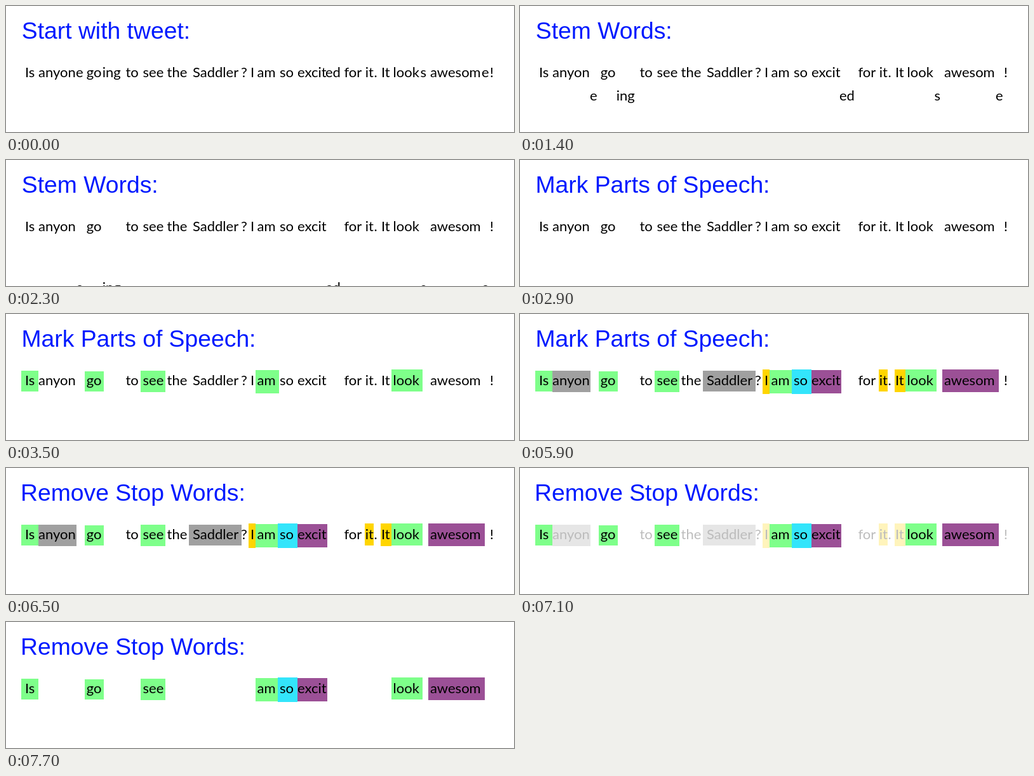
Animation, 800 px wide and 200 px high, one loop 8 s. Source, as an HTML page:

```html
<!DOCTYPE html>
<html lang="en">
<head>
<meta charset="utf-8">
<title>Tweet preprocessing</title>
<style>
html, body { margin: 0; width: 100%; height: 100%; overflow: hidden; background: #fff; }
svg { display: block; width: 800px; height: 200px; }
text { font: 22px Lato, Carlito, sans-serif; white-space: pre; }
#title { font: 37.3px "Liberation Sans", Arial, sans-serif; fill: #001aff; }
</style>
</head>
<body>
<svg viewBox="0 0 800 200">
  <text id="title" y="52"></text>
  <g id="words"></g>
  <g id="suffixes"></g>
</svg>
<script>
const LOOP = 8000, BASELINE = 113;
const $ = id => document.getElementById(id);

// Colour and appearance time of each part of speech
const KINDS = {
  verb: ['#7eff8a', 3500],
  pronoun: ['#ffd500', 4100],
  noun: ['#a0a0a0', 4700],
  adjective: ['#9b5096', 5300],
  adverb: ['#33e5fb', 5900]
};
const KEPT = ['verb', 'adjective', 'adverb'];

// text, x, kind, box [left, top, right, bottom]
const WORDS = [
  ['Is', 30, 'verb', [24, 90, 51, 123]],
  ['anyon', 51, 'noun', [51, 90, 111, 124]],
  ['go', 126.8, 'verb', [124, 91, 154, 123]],
  ['to', 188.5],
  ['see', 215.5, 'verb', [212, 90, 251, 124]],
  ['the', 253.5],
  ['Saddler', 294, 'noun', [288, 90, 371, 123]],
  ['?', 370],
  ['I', 385, 'pronoun', [382, 88, 393, 127]],
  ['am', 395.5, 'verb', [393, 89, 430, 126]],
  ['excit', 459, 'adjective', [458, 89, 506, 126]],
  ['so', 431, 'adverb', [428, 88, 459, 127]],
  ['for', 532.5],
  ['it', 565.8, 'pronoun', [565, 88, 579, 123]],
  ['.', 579.5],
  ['It', 591, 'pronoun', [590, 88, 607, 124]],
  ['look', 609.5, 'verb', [607, 88, 656, 123]],
  ['awesom', 668, 'adjective', [665, 88, 754, 124]],
  ['!', 762]
];
const SUFFIXES = [['e', 110], ['ing', 151.7], ['ed', 503], ['s', 652.5], ['e', 749]];

// start time, x, text
const TITLES = [
  [0, 24.8, 'Start with tweet:'],
  [500, 24.8, 'Stem Words:'],
  [2900, 24.5, 'Mark Parts of Speech:'],
  [6500, 23, 'Remove Stop Words:']
];
const DROP = [0, 6, 18, 37, 57, 77, 97, 117];
const FADE = [1, 0.63, 0.26, 0.05, 0];

function add(parent, tag, attrs, text = '') {
  const node = document.createElementNS('http://www.w3.org/2000/svg', tag);
  for (const key in attrs) node.setAttribute(key, attrs[key]);
  node.textContent = text;
  return parent.appendChild(node);
}

// Value held in 300 ms steps from a start time
function stepped(values, start, t) {
  const i = Math.floor((t - start) / 300);
  return values[Math.max(0, Math.min(values.length - 1, i))];
}

const boxes = [], stopWords = [];
for (const [text, x, kind, box] of WORDS) {
  const group = add($('words'), 'g', {});
  if (kind) {
    const [left, top, right, bottom] = box, [fill, start] = KINDS[kind];
    const node = add(group, 'rect', { x: left, y: top, width: right - left, height: bottom - top, fill });
    boxes.push({ node, start });
  }
  add(group, 'text', { x, y: BASELINE }, text);
  if (!KEPT.includes(kind)) stopWords.push(group);
}
for (const [text, x] of SUFFIXES) add($('suffixes'), 'text', { x, y: BASELINE }, text);

function draw(now) {
  const t = now % LOOP;
  const [, x, label] = TITLES.filter(([start]) => t >= start).pop();
  $('title').setAttribute('x', x);
  $('title').textContent = label;
  $('suffixes').setAttribute('transform', `translate(0 ${stepped(DROP, 500, t)})`);
  for (const { node, start } of boxes) node.style.display = t >= start ? '' : 'none';
  for (const group of stopWords) group.style.opacity = stepped(FADE, 6500, t);
}

const begin = performance.now();
function tick() {
  draw(performance.now() - begin);
  requestAnimationFrame(tick);
}
tick();
</script>
</body>
</html>
```
